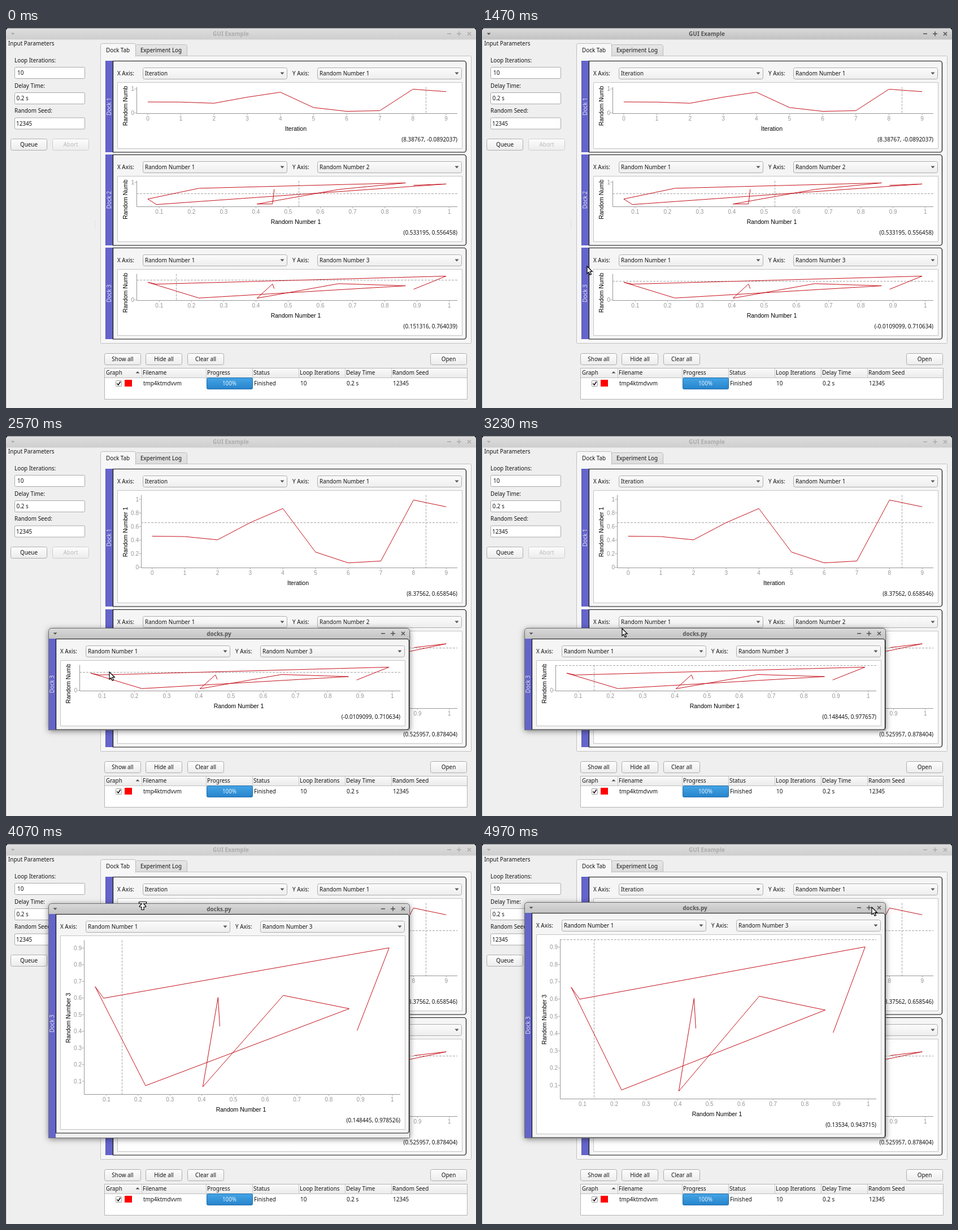
An HTML page with a canvas that plays this animation: 832 px wide and 673 px high, repeating every 5.01 s.

```html
<!DOCTYPE html>
<html>
<head>
<meta charset="utf-8">
<title>GUI Example</title>
<style>
html, body { margin: 0; width: 832px; height: 673px; overflow: hidden; background: #000 }
canvas { display: block }
</style>
</head>
<body>
<canvas id="stage" width="832" height="673"></canvas>
<script>
const g = document.getElementById('stage').getContext('2d');
const LOOP = 5010, FLOAT_AT = 2420, FLOAT_DX = -101, FLOAT_BOTTOM = 520;
const UI = '9.9px "Noto Sans", sans-serif';
const BOLD = 'bold 10px "Noto Sans", sans-serif';
const TICK = '10px "Liberation Sans", Arial, sans-serif';
const AXIS = '10.5px "Liberation Sans", Arial, sans-serif';

const iteration = [0, 1, 2, 3, 4, 5, 6, 7, 8, 9];
const random1 = [.4568, .4514, .4033, .6566, .8644, .2231, .0643, .0911, .9901, .8894];
const random2 = [.72, .12, .115, .71, .977, .757, .32, .094, .932, .88];
const random3 = [.43, .604, .066, .616, .536, .073, .6685, .599, .902, .405];
const docks = [
  { name: 'Dock 1', xs: iteration, ys: random1, xName: 'Iteration', yName: 'Random Number 1' },
  { name: 'Dock 2', xs: random1, ys: random2, xName: 'Random Number 1', yName: 'Random Number 2' },
  { name: 'Dock 3', xs: random1, ys: random3, xName: 'Random Number 1', yName: 'Random Number 3' }
];

// Pointer path: time, x, y
const path = [
  [400, 301, 446], [700, 208, 448], [850, 188, 425], [1300, 188, 425], [1700, 183, 418],
  [2700, 183, 418], [2850, 198, 406], [3200, 248, 341], [3740, 248, 341], [3870, 249, 197],
  [4050, 242, 102], [4350, 242, 102], [4480, 199, 185], [4560, 199, 169], [4900, 690, 112]
];
// Dock 3 crosshair: time, x, y; without values it follows the pointer
const crossKeys = [
  [0, .151316, .764039], [400], [700, -.0109099, .710634], [2700],
  [2850, .148445, .977657], [4050, .148445, .978526], [4400], [4560, .13534, .943715]
];
// Floating window: time, top edge, lower edge of its contents
const windowKeys = [
  [0, 340, 520], [3850, 332, 520], [3930, 270, 520], [4000, 180, 516], [4050, 105, 512], [4130, 103, 520]
];

const held = (keys, t) => keys.filter(k => k[0] <= t).pop();

function pointerAt(t) {
  if (t < path[0][0]) return null;
  const i = path.findIndex(k => k[0] > t);
  if (i < 0) return path[path.length - 1].slice(1);
  const [t0, x0, y0] = path[i - 1], [t1, x1, y1] = path[i], u = (t - t0) / (t1 - t0);
  return [x0 + (x1 - x0) * u, y0 + (y1 - y0) * u];
}

function text(s, x, y, align = 'left', color = '#141414', font = UI) {
  g.font = font;
  g.fillStyle = color;
  g.textAlign = align;
  g.fillText(s, x, y + 3.5);
}

function upright(s, x, y, color, font) {
  g.save();
  g.translate(x, y);
  g.rotate(-Math.PI / 2);
  text(s, 0, 0, 'center', color, font);
  g.restore();
}

function shade(y, h, top, bottom) {
  const c = g.createLinearGradient(0, y, 0, y + h);
  c.addColorStop(0, top);
  c.addColorStop(1, bottom);
  return c;
}

function box(x, y, w, h, r, fill, stroke) {
  g.beginPath();
  g.roundRect(x + .5, y + .5, w - 1, h - 1, r);
  if (fill) { g.fillStyle = fill; g.fill(); }
  if (stroke) { g.lineWidth = 1; g.strokeStyle = stroke; g.stroke(); }
}

function rect(x, y, w, h, fill) {
  g.fillStyle = fill;
  g.fillRect(x, y, w, h);
}

function line(points, color, width = 1, dash = []) {
  g.beginPath();
  points.forEach(p => g.lineTo(...p));
  g.setLineDash(dash);
  g.lineWidth = width;
  g.strokeStyle = color;
  g.stroke();
  g.setLineDash([]);
}

function shape(points, fill) {
  g.beginPath();
  points.forEach(p => g.lineTo(...p));
  g.closePath();
  g.fillStyle = fill;
  g.fill();
}

function button(s, x, y, disabled) {
  box(x, y, 65, 21, 3, shade(y, 21, '#fdfdfd', '#ececec'), disabled ? '#cfcfcf' : '#adadad');
  text(s, x + 32.5, y + 10.5, 'center', disabled ? '#bcbcbc' : undefined);
}

function field(label, value, y, x) {
  text(label, 15, y);
  box(15, y + 12, 125, 21, 2, '#fff', '#a9a9a9');
  text(value, x, y + 22.5);
}

function combo(s, x, y) {
  box(x, y, 256, 21, 3, shade(y, 21, '#fcfcfc', '#ededed'), '#adadad');
  text(s, x + 4, y + 10.5);
  shape([[x + 243.5, y + 8.5], [x + 250.5, y + 8.5], [x + 247, y + 12.5]], '#555');
}

function titleBar(s, x, y, w, h, active) {
  const ink = active ? '#555' : '#acacac', right = x + w, mid = y + h / 2;
  g.beginPath();
  g.roundRect(x, y, w, h, [5, 5, 0, 0]);
  g.fillStyle = active ? shade(y, h, '#dadada', '#c2c2c2') : shade(y, h, '#dedede', '#cecece');
  g.fill();
  line([[x + 4, y + .5], [right - 4, y + .5]], '#8a8a8a');
  shape([[x + 8.5, mid - 1.5], [x + 15.5, mid - 1.5], [x + 12, mid + 2]], ink);
  text(s, x + w / 2 - 18, mid + .5, 'center', ink, BOLD);
  line([[right - 51, mid], [right - 44, mid]], ink, 1.6);
  line([[right - 34, mid], [right - 26, mid]], ink, 1.6);
  line([[right - 30, mid - 4], [right - 30, mid + 4]], ink, 1.6);
  line([[right - 15, mid - 3], [right - 9, mid + 3]], ink, 1.6);
  line([[right - 15, mid + 3], [right - 9, mid - 3]], ink, 1.6);
}

// Maps data to pixels with the padding that depends on the view size
function scale(values, from, to) {
  const size = Math.abs(to - from), pad = Math.min(.1, .9 / Math.sqrt(size));
  const lo = Math.min(...values), span = Math.max(...values) - lo;
  const min = lo - span * pad, range = span * (1 + 2 * pad);
  return {
    px: v => from + (v - min) / range * (to - from),
    value: p => min + (p - from) / (to - from) * range,
    min, max: min + range
  };
}

function ticks(s, step) {
  const list = [];
  for (let i = Math.ceil(s.min / step); i * step <= s.max; i++) list.push(+(i * step).toFixed(1));
  return list;
}

function plot(dock, dx, top, bottom, cross, pointer) {
  const y0 = top + 46.5, y1 = bottom - 68.5, h = y1 - y0;
  const step = h < 80 ? 1 : h < 200 ? .2 : .1;
  const x0 = dx + (step === 1 ? 231 : 239), x1 = dx + 799;
  const sx = scale(dock.xs, x0, x1), sy = scale(dock.ys, y1, y0);
  const grey = '#969696';

  box(dx + 197, top + 38, 611, bottom - top - 44, 0, '#fff', '#c4c4c4');
  g.save();
  g.beginPath();
  g.rect(dx + 198, top + 45, 609, bottom - top - 52);
  g.clip();
  upright(dock.yName, dx + 211.5, (y0 + y1) / 2 + 1, '#000', AXIS);
  g.restore();

  line([[x0 + .5, y0], [x0 + .5, y1], [x1, y1]], grey);
  for (const v of ticks(sy, step)) {
    const y = sy.px(v);
    line([[x0 - 4, y], [x0, y]], '#b4b4b4');
    text(v, x0 - 4, y, 'right', grey, TICK);
  }
  for (const v of ticks(sx, dock.xs === iteration ? 1 : .1)) {
    const x = sx.px(v);
    line([[x, y1], [x, y1 + 3]], '#b4b4b4');
    text(v, x, bottom - 59.5, 'center', grey, TICK);
  }
  text(dock.xName, (x0 + x1) / 2 - 2, bottom - 42, 'center', '#000', AXIS);

  const [cx, cy] = cross || [sx.value(pointer[0]), sy.value(pointer[1])].map(v => +v.toPrecision(6));
  text(`(${cx}, ${cy})`, x1, bottom - 22.5, 'right');
  g.save();
  g.beginPath();
  g.rect(x0, y0 - .5, x1 - x0, h + .5);
  g.clip();
  const lx = Math.round(sx.px(cx)) + .5, ly = Math.round(sy.px(cy)) + .5;
  line([[lx, y0], [lx, y1]], '#a6a6a6', 1, [4, 2]);
  line([[x0, ly], [x1, ly]], '#a6a6a6', 1, [4, 2]);
  line(dock.xs.map((v, i) => [sx.px(v), sy.px(dock.ys[i])]), '#c4101a');
  g.restore();
}

function drawDock(dock, dx, top, bottom, cross, pointer) {
  rect(dx + 176, top, 13, bottom - top, '#6464ca');
  line([[dx + 176.5, top], [dx + 176.5, bottom]], '#5555bb');
  upright(dock.name, dx + 182.5, (top + bottom) / 2, '#e4e4f2', UI);
  g.beginPath();
  g.roundRect(dx + 189.5, top + .5, 625, bottom - top - .5, [0, 4, 4, 0]);
  g.fillStyle = '#f5f5f5';
  g.fill();
  g.lineWidth = 1.2;
  g.strokeStyle = '#111';
  g.stroke();
  text('X Axis:', dx + 197, top + 22);
  combo(dock.xName, dx + 242, top + 12);
  text('Y Axis:', dx + 507, top + 22);
  combo(dock.yName, dx + 551, top + 12);
  plot(dock, dx, top, bottom, cross, pointer);
}

function drawTable() {
  box(174, 602, 643, 56, 0, '#fff', '#b4b4b4');
  rect(175, 603, 641, 16, shade(603, 16, '#fafafa', '#ebebeb'));
  line([[175, 619.5], [816, 619.5]], '#c2c2c2');
  const columns = [
    ['Graph', 177, 240], ['Filename', 242, 354], ['Progress', 356, 436], ['Status', 438, 518],
    ['Loop Iterations', 520, 600], ['Delay Time', 602, 682], ['Random Seed', 684]
  ];
  for (const [name, x, edge] of columns) {
    text(name, x, 610.5);
    if (edge) line([[edge + .5, 603], [edge + .5, 619]], '#c8c8c8');
  }
  shape([[229.5, 611.5], [236.5, 611.5], [233, 608]], '#555');
  box(194, 624, 11, 11, 1, '#fff', '#999');
  line([[196.5, 629.5], [198.7, 632.2], [202.7, 626.3]], '#111', 1.6);
  rect(210, 623, 13, 12, '#f00');
  box(355, 619, 82, 21, 2, shade(619, 21, '#45a5e6', '#2683cb'), '#1f6cab');
  text('100%', 395.5, 629.5, 'center', '#e8f3fc');
  [['tmp4ktmdvvm', 243], ['Finished', 439], ['10', 521], ['0.2 s', 603], ['12345', 685]]
    .forEach(([s, x]) => text(s, x, 629.5));
}

function drawMain(active) {
  rect(0, 0, 832, 673, '#000');
  rect(0, 20, 832, 653, '#efefef');
  titleBar('GUI Example', 0, 0, 832, 20.5, active);
  line([[.5, 20], [.5, 673]], '#c4c4c4');
  text('Input Parameters', 4, 27.5);
  field('Loop Iterations:', '10', 57, 20);
  field('Delay Time:', '0.2 s', 102, 18.5);
  field('Random Seed:', '12345', 146.5, 18);
  button('Queue', 8, 196);
  button('Abort', 82, 196, true);
  for (let y = 341; y < 355; y += 3) rect(157, y, 1, 1, '#c8c8c8');

  box(167, 49, 657, 510, 1, '#f7f7f7', '#c2c2c2');
  box(229, 29, 92, 21, [3, 3, 0, 0], shade(29, 21, '#e6e6e6', '#dcdcdc'), '#bcbcbc');
  box(167, 27, 63, 24, [3, 3, 0, 0], '#f7f7f7', '#bcbcbc');
  rect(168, 49, 61, 3, '#f7f7f7');
  text('Dock Tab', 198, 39, 'center');
  text('Experiment Log', 274.5, 39.5, 'center');
  button('Show all', 174, 576);
  button('Hide all', 247, 576);
  button('Clear all', 321, 576);
  button('Open', 751, 576);
  drawTable();
}

function drawFloat(t, cross, pointer) {
  const [, top, bottom] = held(windowKeys, t);
  const h = FLOAT_BOTTOM + 1 - top;
  g.save();
  g.shadowColor = 'rgba(0,0,0,.5)';
  g.shadowBlur = 11;
  g.shadowOffsetY = 2;
  box(75, top, 640, h, [5, 5, 1, 1], '#efefef');
  g.restore();
  rect(75, top + 19, 13, h - 19, '#6464ca');
  titleBar('docks.py', 75, top, 640, 19.5, true);
  drawDock(docks[2], FLOAT_DX, top + 19, bottom, cross, pointer);
  box(75, top, 640, h, [5, 5, 1, 1], null, '#6e6e6e');
}

function drawPointer([x, y], resizing) {
  g.save();
  g.translate(Math.round(x), Math.round(y));
  g.beginPath();
  const outline = resizing
    ? [[-6.5, .5], [6.5, .5], [6.5, 3.5], [1.5, 3.5], [5.5, 8], [5.5, 9.5], [2, 9.5], [2, 14.5],
       [-2, 14.5], [-2, 9.5], [-5.5, 9.5], [-5.5, 8], [-1.5, 3.5], [-6.5, 3.5]]
    : [[0, 0], [0, 13], [3, 10.3], [5.2, 15.2], [7.5, 14.2], [5.3, 9.4], [9.3, 9.2]];
  outline.forEach(p => g.lineTo(...p));
  g.closePath();
  g.fillStyle = '#fff';
  g.strokeStyle = '#000';
  g.lineWidth = 1.2;
  g.fill();
  g.stroke();
  g.restore();
}

function draw(t) {
  const floating = t >= FLOAT_AT, pointer = pointerAt(t);
  const key = held(crossKeys, t), cross = key.length > 1 ? key.slice(1) : null;
  drawMain(t >= 1000 && !floating);
  if (floating) {
    drawDock(docks[0], 0, 58, 302, [8.37562, .658546]);
    drawDock(docks[1], 0, 307, 551, [.525957, .878404]);
    drawFloat(t, cross, pointer);
  } else {
    drawDock(docks[0], 0, 58, 220, [8.38767, -.0892037]);
    drawDock(docks[1], 0, 224, 385, [.533195, .556458]);
    drawDock(docks[2], 0, 389, 551, cross, pointer);
  }
  if (pointer) drawPointer(pointer, t > 3400 && t < 4300);
}

const start = performance.now();
function frame() {
  draw((performance.now() - start) % LOOP);
  requestAnimationFrame(frame);
}
frame();
</script>
</body>
</html>
```
